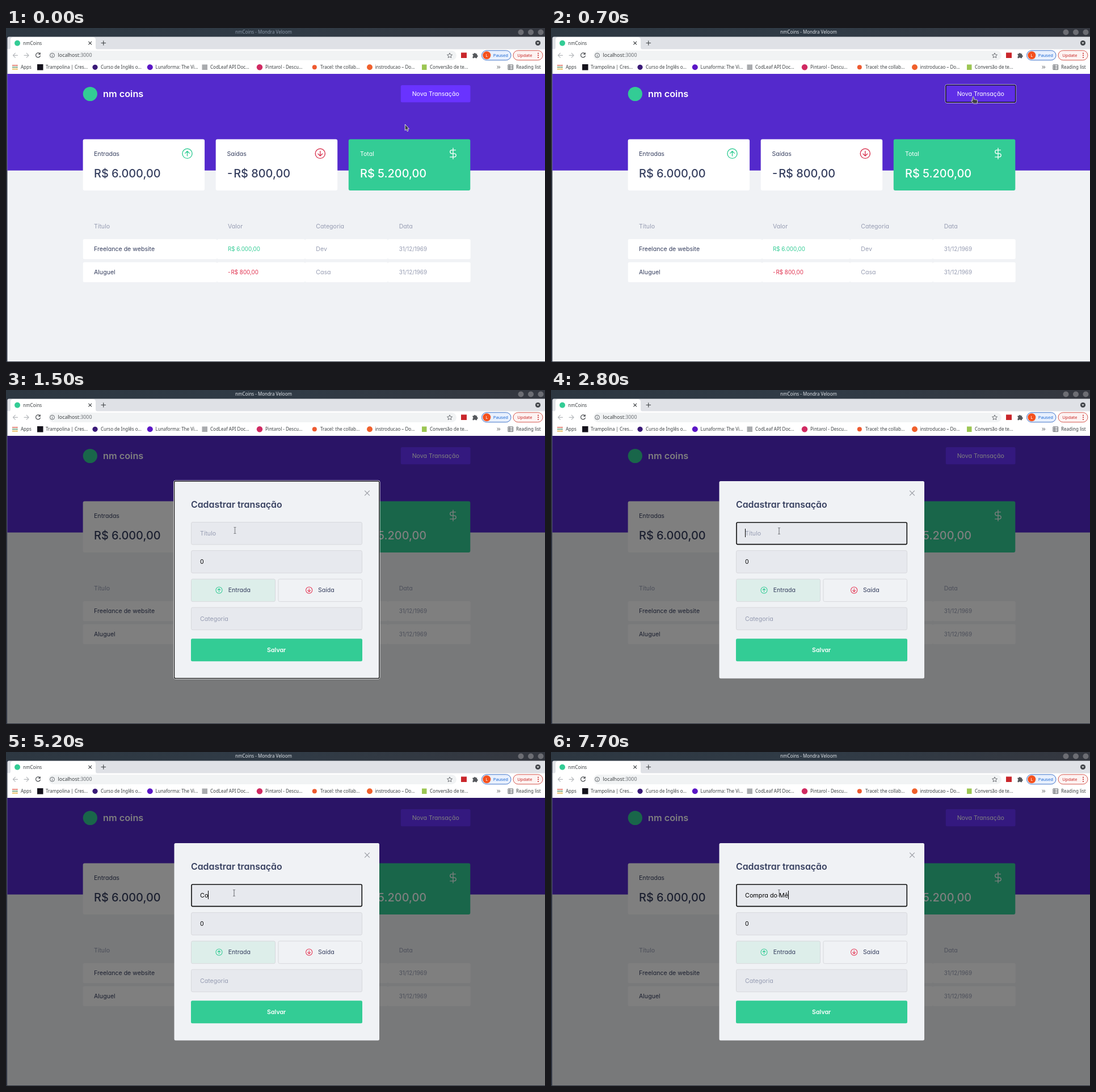
An HTML page that plays this animation: 950x590 px, repeating every 8000 ms.

```html
<!DOCTYPE html>
<html lang="pt-BR">
<head>
<meta charset="utf-8">
<title>nmCoins</title>
<style>
  html, body { margin: 0; width: 100%; height: 100%; overflow: hidden; background: #f0f2f5; }
  svg { display: block; width: 100vw; height: 100vh; }
  text { font: 10.6px Inter, Roboto, sans-serif; font-feature-settings: "cv11"; white-space: pre; }
  .ui text { font: 8px "Noto Sans", "Open Sans", sans-serif; fill: #3c4043; }
  .ui .url { font-size: 8.85px; }
  .ui .pill { font-size: 7.6px; font-weight: 500; }
  .mid { text-anchor: middle; }
  .ink { fill: #363f5f; }
  .soft { fill: #969cb2; }
  .white { fill: #fff; }
  .amount { font-size: 19.9px; font-weight: 500; }
  .num { font-size: 9.8px; }
  .brand { font-size: 16.3px; font-weight: 600; }
  .head { font-size: 15.9px; font-weight: 600; }
  .save { font-weight: 600; }
  #typed { font-size: 10.8px; }
  .line { fill: none; stroke-linecap: round; stroke-linejoin: round; }
  .box { fill: #e7e9ee; stroke: #d7d8dc; }
  .ring { fill: none; stroke: #101010; }
  .halo { fill: none; stroke: #fff; }

  /* one loop is 8 s, so 1.25% = 100 ms */
  .t { animation: 8s step-end infinite; }
  .ui #title { animation-name: title; }
  #button { animation-name: hover; }
  #buttonRing { animation-name: buttonRing; }
  #modal { animation-name: open; }
  #modalRing { animation-name: modalRing; }
  #fieldRing { animation-name: fieldRing; }
  #cursor { animation-name: move; }
  #arrow { animation-name: arrow; }
  #hand { animation-name: hand; }
  #beam { animation-name: beam; }

  @keyframes title { 0% { fill: #8b98a8 } 8.75%, 100% { fill: #dfe3e8 } }
  @keyframes hover {
    0% { fill: #6933ff } 6.25% { fill: #6632f7 } 7.5% { fill: #6230ee }
    8.75% { fill: #5f2ee6 } 11.25% { fill: #642ff2 } 12.5%, 100% { fill: #6933ff }
  }
  @keyframes buttonRing { 0% { opacity: 0 } 8.75% { opacity: 1 } 10%, 100% { opacity: 0 } }
  @keyframes open { 0% { opacity: 0 } 10%, 100% { opacity: 1 } }
  @keyframes modalRing { 0% { opacity: 1 } 20%, 100% { opacity: 0 } }
  @keyframes fieldRing { 0% { opacity: 0 } 20%, 100% { opacity: 1 } }
  @keyframes arrow { 0% { opacity: 1 } 6.25% { opacity: 0 } 10% { opacity: 1 } 16.25%, 100% { opacity: 0 } }
  @keyframes hand { 0% { opacity: 0 } 6.25% { opacity: 1 } 10%, 100% { opacity: 0 } }
  @keyframes beam { 0% { opacity: 0 } 16.25%, 100% { opacity: 1 } }
  @keyframes move {
    0% { transform: translate(703px, 170px) }
    2.5% { transform: translate(706px, 166px) }
    3.75% { transform: translate(715px, 154px) }
    5% { transform: translate(728px, 139px) }
    6.25% { transform: translate(738px, 127px) }
    7.5% { transform: translate(742px, 123px) }
    8.75% { transform: translate(743px, 121.5px) }
    10% { transform: translate(738.5px, 126px) }
    11.25% { transform: translate(706px, 152px) }
    12.5% { transform: translate(658px, 186px) }
    13.75% { transform: translate(586px, 214px) }
    15% { transform: translate(512px, 232px) }
    16.25% { transform: translate(450px, 242px) }
    17.5% { transform: translate(414px, 247px) }
    18.75% { transform: translate(403.5px, 248px) }
    20% { transform: translate(402.5px, 248.5px) }
    21.25%, 100% { transform: translate(402px, 249px) }
  }
</style>
</head>
<body>
<svg viewBox="0 0 950 590">
  <defs>
    <linearGradient id="bar">
      <stop offset="0" stop-color="#2d3741"/><stop offset=".5" stop-color="#303b46"/><stop offset="1" stop-color="#34373f"/>
    </linearGradient>
    <g id="up" class="line"><circle r="10"/><path d="M0 5V-5M-4.5-.5L0-5L4.5-.5"/></g>
    <path id="dollar" class="line" d="M0-11V11M5-7H-2.5a3.5 3.5 0 0 0 0 7h5a3.5 3.5 0 0 1 0 7H-6"/>
  </defs>

  <rect width="950" height="590" fill="#2f343f"/>
  <rect width="950" height="16" fill="url(#bar)"/>

  <g class="ui">
    <text id="title" class="t mid" x="454" y="9.8">nmCoins - Mondra Veloom</text>
    <g fill="#6c6d73"><circle cx="907.5" cy="7.5" r="5"/><circle cx="925" cy="7.5" r="5"/><circle cx="942.5" cy="7.5" r="5"/></g>
    <path d="M2.4 18.5q0-3 3-3H950V38H2.4z" fill="#dfe1e6"/>
    <path d="M4 38q4 0 4-4V21q0-5 5-5H153q5 0 5 5V34q0 4 4 4z" fill="#fff"/>
    <rect x="2.4" y="37.5" width="947.6" height="43.5" fill="#fff"/>
    <circle cx="20" cy="26.7" r="5" fill="#33cc95"/>
    <text x="30" y="29.7">nmCoins</text>
    <path class="line" stroke="#3c4043" stroke-width="1.1" d="M145.7 24.2l5 5m0-5l-5 5M168 26.5h7.6m-3.8-3.8v7.6"/>
    <circle cx="937.5" cy="26.5" r="4.6" fill="#45484d"/>
    <path d="M935.3 25.4h4.4l-2.2 2.7z" fill="#fff"/>

    <g class="line" stroke-width="1.2">
      <path stroke="#b5b8bc" d="M20.5 48.3H12.5m3.8-3.9l-3.9 3.9l3.9 3.9M32 48.3h8m-3.8-3.9l3.9 3.9l-3.9 3.9"/>
      <path stroke="#4a4d51" d="M59.8 45.6a4 4 0 1 0 .6 3.4M60.2 43.8v2.6h-2.6"/>
    </g>
    <rect x="75" y="40" width="719" height="17" rx="8.5" fill="#f1f3f4"/>
    <circle cx="81.5" cy="48.3" r="3.9" fill="none" stroke="#5f6368"/>
    <path d="M81.5 46v.9m0 1.1v2.5" stroke="#5f6368"/>
    <text class="url" x="91.5" y="51.4">localhost<tspan fill="#6b7075">:3000</tspan></text>
    <path d="M782 44l1.3 3 3.2.3-2.4 2.1.7 3.1-2.8-1.6-2.8 1.6.7-3.1-2.4-2.1 3.2-.3z" fill="none" stroke="#5f6368" stroke-width=".9"/>
    <rect x="802" y="43.5" width="10" height="9.5" fill="#c9262b"/>
    <path d="M822.5 45.5h2.2a1.6 1.6 0 0 1 3.2 0h2.3v2.5a1.6 1.6 0 0 1 0 3.2v2h-2.6a1.5 1.5 0 0 0-2.8 0h-2.3v-2.6a1.5 1.5 0 0 0 0-2.8z" fill="#55585c"/>
    <rect x="838.5" y="39.8" width="51.5" height="17" rx="8.5" fill="#e8f0fe" stroke="#3f72c8"/>
    <circle cx="847.3" cy="48.3" r="7" fill="#f4511e"/>
    <text class="pill mid" x="847.3" y="51" style="fill:#fff">L</text>
    <text class="pill" x="858.8" y="51" style="fill:#1967d2">Paused</text>
    <rect x="894" y="39.8" width="52" height="17" rx="8.5" fill="#fdf3f2" stroke="#d4564d"/>
    <text class="pill" x="901.3" y="51" style="fill:#c5221f">Update</text>
    <g fill="#c5221f"><circle cx="938" cy="44.7" r="1"/><circle cx="938" cy="48.3" r="1"/><circle cx="938" cy="51.9" r="1"/></g>

    <g stroke-width="2.1" stroke-dasharray="2.1 1.2">
      <path d="M11.5 66h9" stroke="#d8503f"/><path d="M11.5 69.3h9" stroke="#3f7f4c"/><path d="M11.5 72.6h9" stroke="#e2a72c"/>
    </g>
    <text x="26" y="72.2">Apps</text>
    <rect x="55" y="64" width="10.5" height="10.5" fill="#14121c"/>
    <text x="70" y="72.2">Trampolina | Cres...</text>
    <circle cx="157" cy="69.3" r="4.6" fill="#3a1a78"/>
    <text x="167" y="72.2">Curso de Inglês o...</text>
    <circle cx="253.8" cy="69.3" r="5" fill="#5b16c6"/>
    <text x="263.5" y="72.2">Lunaforma: The Vi...</text>
    <rect x="345.5" y="64.5" width="9.5" height="9.5" fill="#a9abae"/>
    <text x="360" y="72.2">CodLeaf API Doc...</text>
    <circle cx="447" cy="69.3" r="5.2" fill="#d02a62"/>
    <text x="457" y="72.2">Pintarol - Descu...</text>
    <circle cx="543.8" cy="69.3" r="4" fill="#ee5a30"/>
    <text x="554" y="72.2">Tracel: the collab...</text>
    <circle cx="641" cy="69.3" r="5" fill="#f0602c"/>
    <text x="650.5" y="72.2">instroducao – Do...</text>
    <rect x="733" y="64.5" width="8.5" height="9.5" fill="#9cc653"/>
    <text x="747" y="72.2">Conversão de te...</text>
    <path class="line" stroke="#3c4043" d="M866 67.2l2 2-2 2m2.8-4l2 2-2 2"/>
    <path fill="none" stroke="#5f6368" d="M885 65h8.5v8.5H885zM887.8 65v8.5M885 68h8.5M885 70.8h8.5"/>
    <text x="899" y="72.2">Reading list</text>
  </g>

  <rect x="2.4" y="81" width="947.6" height="508" fill="#f0f2f5"/>
  <rect x="2.4" y="81" width="947.6" height="170.7" fill="#5429cc"/>
  <circle cx="148.3" cy="116.5" r="12.6" fill="#33cc95"/>
  <text class="brand white" x="171" y="122">nm coins</text>
  <rect id="button" class="t" x="695.8" y="101" width="122.7" height="30.3" rx="2.5"/>
  <text class="white mid" x="757.2" y="120.3">Nova Transação</text>
  <g id="buttonRing" class="t">
    <rect class="halo" x="694.9" y="99.9" width="124.8" height="32.4" rx="3" stroke-width=".8"/>
    <rect class="ring" x="695.9" y="100.9" width="122.8" height="30.4" rx="2.2" stroke-width="1.4"/>
  </g>

  <g class="white">
    <rect x="135.6" y="196.6" width="214.5" height="90.5" rx="3"/>
    <rect x="369.7" y="196.6" width="214.5" height="90.5" rx="3"/>
    <rect x="603.8" y="196.6" width="214.5" height="90.5" rx="3" fill="#33cc95"/>
  </g>
  <g class="ink">
    <text x="155" y="226">Entradas</text><text class="amount" x="155" y="264.2">R$ 6.000,00</text>
    <text x="389.5" y="226">Saídas</text><text class="amount" x="390" y="264.2">-<tspan dx="2">R$ 800,00</tspan></text>
  </g>
  <g class="white"><text x="624" y="226">Total</text><text class="amount" x="624" y="264.2">R$ 5.200,00</text></g>
  <use href="#up" transform="translate(319.5 221.8) scale(.86)" stroke="#33cc95" stroke-width="1.6"/>
  <use href="#up" transform="translate(553.8 221.8) scale(.86 -.86)" stroke="#d83350" stroke-width="1.6"/>
  <use href="#dollar" transform="translate(788 221.8) scale(.87)" stroke="#fff" stroke-width="1.5"/>

  <g class="soft">
    <text x="155" y="353.6">Título</text><text x="391" y="353.6">Valor</text>
    <text x="546.3" y="353.6">Categoria</text><text x="692.7" y="353.6">Data</text>
  </g>
  <g id="cells" class="white"></g>
  <g class="ink"><text x="155" y="394.4">Freelance de website</text><text x="155" y="435.2">Aluguel</text></g>
  <text class="num" x="391" y="394.2" fill="#33cc95">R$ 6.000,00</text>
  <text class="num" x="391" y="435" fill="#e02f4d">-<tspan dx="1">R$ 800,00</tspan></text>
  <g class="soft">
    <text x="546.3" y="394.4">Dev</text><text class="num" x="692.7" y="394.2">31/12/1969</text>
    <text x="546.3" y="435.2">Casa</text><text class="num" x="692.7" y="435">31/12/1969</text>
  </g>

  <g id="modal" class="t">
    <rect x="2.4" y="81" width="947.6" height="508" opacity=".5"/>
    <rect x="296.5" y="161" width="361.5" height="348.5" rx="2.5" fill="#f0f2f5"/>
    <g id="modalRing" class="t">
      <rect class="halo" x="295.5" y="160" width="363.5" height="350.3" rx="3" stroke-width=".9"/>
      <rect class="ring" x="296.6" y="161.1" width="361.3" height="348.2" rx="2" stroke-width="1.3"/>
    </g>
    <path class="line" stroke="#999ca3" stroke-width="1.2" d="M632.5 178.2l8 8m0-8l-8 8"/>
    <text class="head ink" x="326" y="207.5">Cadastrar transação</text>
    <g class="box">
      <rect x="326.5" y="233.5" width="301" height="39.5" rx="2.5"/>
      <rect x="326.5" y="283.7" width="301" height="39.5" rx="2.5"/>
      <rect x="326.5" y="384.2" width="301" height="39.5" rx="2.5"/>
      <rect x="326.5" y="334" width="148" height="39.7" rx="2.5" fill="#ddeeea"/>
      <rect x="480" y="334" width="147.5" height="39.7" rx="2.5" fill="none"/>
    </g>
    <g id="fieldRing" class="t">
      <rect class="ring" x="327" y="234" width="300.3" height="38.6" rx="2" stroke-width="1.6"/>
    </g>
    <text id="hint" class="soft" x="342" y="256.8">Título</text>
    <text id="typed" x="342" y="256.8"></text>
    <rect id="caret" x="342" y="245" width="1" height="15"/>
    <text x="342" y="306.9">0</text>
    <use href="#up" transform="translate(375.5 353.6) scale(.56)" stroke="#33cc95" stroke-width="1.8"/>
    <text class="ink" x="391.7" y="357.3">Entrada</text>
    <use href="#up" transform="translate(534.2 353.6) scale(.56 -.56)" stroke="#e52e4d" stroke-width="1.8"/>
    <text class="ink" x="550" y="357.3">Saída</text>
    <text class="soft" x="342" y="407.5">Categoria</text>
    <rect x="326" y="439.2" width="302" height="40" rx="2.5" fill="#33cc95"/>
    <text class="save white mid" x="476.7" y="462.9">Salvar</text>
  </g>

  <g id="cursor" class="t">
    <path id="arrow" class="t" d="M.3 0V11L2.6 8.9L4.2 12.5L6 11.7L4.5 8.2H7.4z" fill="#3d3d40" stroke="#fff" stroke-width=".8"/>
    <path id="hand" class="t" d="M.8 0q1.3-.3 1.5 1.1V4.5l5.2 1q1.4.3 1.3 1.8L8 11.9H1.9L-2 8q-.9-1.3.6-1.7L0 7.1V1.1q0-.9.8-1.1z" fill="#3d3d40" stroke="#fff" stroke-width=".8"/>
    <path id="beam" class="t" d="M-1.8-5.5H-.5L0-5L.5-5.5H1.8M0-5V5M-1.8 5.5H-.5L0 5L.5 5.5H1.8" fill="none" stroke="#55575c" stroke-width=".9"/>
  </g>
</svg>
<script>
  const $ = id => document.getElementById(id);
  const LOOP = 8000, PHRASE = "Compra do Mê";

  // moments in ms at which the text grows to the given length
  const keys = [[5000, 1], [5200, 2], [5300, 3], [5500, 4], [5600, 5], [5700, 6],
    [5900, 7], [6000, 8], [6200, 10], [6800, 11], [7700, 12]];
  const FOCUS = 1600, BLINK = 600;

  const edges = [135.7, 372, 527, 673, 818.7];
  $("cells").innerHTML = [373, 413.7].map(y => edges.slice(1).map((end, i) =>
    `<rect x="${edges[i]}" y="${y}" width="${end - edges[i]}" height="35.3" rx="2.5"/>`).join("")).join("");

  const start = performance.now();
  for (const a of document.getAnimations()) a.startTime = start;

  function draw(now) {
    const t = Math.max(0, now - start) % LOOP;
    const [since, count] = keys.filter(k => k[0] <= t).pop() || [FOCUS, 0];
    const text = PHRASE.slice(0, count);
    if ($("typed").textContent !== text) $("typed").textContent = text;
    $("hint").style.opacity = count ? 0 : 1;
    $("caret").setAttribute("x", 342 + Math.floor(count ? $("typed").getComputedTextLength() : 0));
    const lit = t >= FOCUS && Math.floor((t - since) / BLINK) % 2 === 0;
    $("caret").style.opacity = lit ? 1 : 0;
    requestAnimationFrame(draw);
  }
  draw(start);
</script>
</body>
</html>
```
